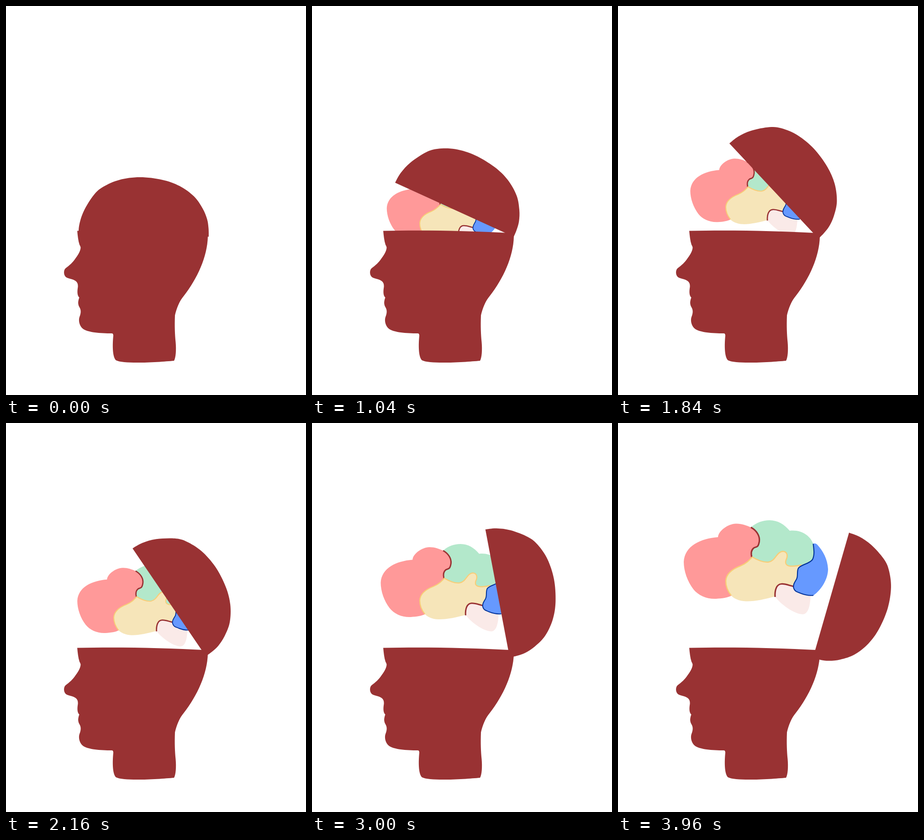
Animation, 657 px wide and 852 px high, one loop 4000 ms. Source, as an HTML page with a canvas:

```html
<!DOCTYPE html>
<html lang="en">
<head>
<meta charset="utf-8">
<title>Opening head</title>
<style>
html, body { margin: 0; width: 657px; height: 852px; overflow: hidden; background: #fff; }
canvas { display: block; }
</style>
</head>
<body>
<canvas id="stage" width="657" height="852"></canvas>
<script>
const ctx = document.getElementById('stage').getContext('2d');

const LOOP = 4000, HOLD = 200, STEP = 40, LAST = 95;
const SKIN = '#993233';
const PIVOT = { x: 428.8, y: 501.2 };
const TURN = 1.117 * Math.PI / 180;

const head = new Path2D(`M156 492.5 C240 490.5 340 492 441.5 497.5 L442 505
  C441 549 419 597 389 635.5 C380 646 373.500 662 370 677.5 C369 703 370 720 371.5 736
  C373 753 372 770 368 777 C335 780 258 785 241 776 C234 770 232.5 748 235 722
  Q235 718 232.5 717 C205 717 180 715 168.500 707 C160 700 158.500 688 161 681
  C165 671 164 665 161 660 C157 653 157.500 647 160.500 638.500
  C155.500 634 156 624 157.500 615 C158 607 155 602 146 599 C137 596 132 596 129 591
  C126 586 126.500 577 131 574 C139 568 146 562 152 553 C158 545 163 537 163.500 529
  Q163 526 161 523 C158 514 157 503 156 492.5 Z`);

// Smooth curve through the dome, then the straight cut edge.
const dome = [[157, 501], [159.2, 476.7], [169.3, 446.7], [190.7, 412.5], [211.4, 394.5],
  [246.5, 379.4], [291.7, 373.6], [340.5, 379.2], [378.7, 392.8], [410.3, 415.6],
  [429, 441.8], [438.8, 465], [442, 485], [442.5, 504]];

function smooth(points) {
  const path = new Path2D();
  path.moveTo(...points[0]);
  for (let i = 0; i < points.length - 1; i++) {
    const b = points[i], c = points[i + 1];
    const a = points[i - 1] || b, d = points[i + 2] || c;
    path.bezierCurveTo(b[0] + (c[0] - a[0]) / 6, b[1] + (c[1] - a[1]) / 6,
      c[0] - (d[0] - b[0]) / 6, c[1] - (d[1] - b[1]) / 6, c[0], c[1]);
  }
  return path;
}
const cap = smooth(dome);
cap.lineTo(PIVOT.x, PIVOT.y - 0.4);
cap.closePath();

const redSeam = 'M291 228.5 C303 235 311 247 309.5 259 C307 275 302 270 297 274 C291 279 291 286 293 294';
const goldSeam = `M248 378 C240 368 236 356 236 346 C237 327 255 318 268 313
  C282 307 288 300 294 293.500 C305 300 318 306 330 304.500 C346 301 346 284 360 281
  C372 281 372 292 368 300 C364 312 374 314 383 313.500 Q394 313 402 310.500`;
const navySeam = `M427.500 264.500 C429 277 431 289 426 299 C419 309 402 309 395 318
  C391 326 395 334 391 342 C387 349 383 354 384.500 361 C387 370 394 370 400 373
  C410 377 418 378.500 428 377.500`;
const stemSeam = 'M344 381 C343 366 347 353 358 352.500 C368 352 375 356 385 358';

// Each lobe: fill colour, shape, then optional seam path, colour and width.
const lobes = [
  ['#ff9999', `M219 250 C220 236 241 221 258 220.500 C270 220 281 224 291 228.500
    L301 230 L312 245 L312 264 L303 276 L296 300 L250 377.500 C240 383 228 384 215 385
    C195 386 176 378 165 364 C152 347 144 324 144 304 C146 269 181 253 219 250 Z`],
  ['#b3e8cb', `M291 228.500 C303 218 317 213 332 213 C350 213 364 222 376 236
    C401 233 422 247 428 266 L429 290 L424 304 L400 315 L367 325 L300 310 L293 294
    C291 286 291 279 297 274 C302 270 307 275 309.500 259 C311 247 303 235 291 228.500 Z`,
    redSeam, SKIN, 3.2],
  ['#f6e5b9', goldSeam + ' L396 322 L394 345 L386 361 L344 380 C321 386 300 391 280 390.500 C265 390 253 384 248 378 Z',
    goldSeam, '#f8cd77', 2.5],
  ['#faeae8', stemSeam + ' L422 376 C421 400 417 419 404 419 C385 418 355 396 344 380 Z',
    stemSeam, SKIN, 3.2],
  ['#6699ff', navySeam + ' C445 366 460 342 460 320 C459 298 449 280 436 266 Q432 262.500 427.500 264.500 Z',
    navySeam, '#003399', 2.2]
].map(([fill, shape, seam, color, width]) =>
  ({ fill, shape: new Path2D(shape), seam: seam && new Path2D(seam), color, width }));

function drawBrain(k) {
  const left = LAST - k, scale = 1 - 0.00294 * left;
  ctx.save();
  ctx.translate(236, 390 + 1.65 * left);
  ctx.scale(scale, scale);
  ctx.translate(-236, -390);
  for (const lobe of lobes) {
    ctx.fillStyle = lobe.fill;
    ctx.fill(lobe.shape);
    if (!lobe.seam) continue;
    ctx.strokeStyle = lobe.color;
    ctx.lineWidth = lobe.width;
    ctx.stroke(lobe.seam);
  }
  ctx.restore();
}

// The hinge drifts slightly while the cap swings open.
function drawCap(k) {
  const p = k / LAST, settle = Math.max(0, 1 - k / 12);
  ctx.save();
  ctx.translate(PIVOT.x + 1.5 * p, PIVOT.y - 1.5 * Math.sin(Math.PI * p));
  ctx.rotate(TURN * k);
  ctx.translate(1.5 * settle - PIVOT.x, 1.5 * settle - PIVOT.y);
  ctx.fill(cap);
  ctx.restore();
}

function draw(now) {
  const t = now % LOOP;
  const k = t < HOLD ? 0 : Math.min(LAST, Math.floor((t - HOLD) / STEP) + 1);
  ctx.fillStyle = '#fff';
  ctx.fillRect(0, 0, 657, 852);
  drawBrain(k);
  ctx.fillStyle = SKIN;
  ctx.fill(head);
  drawCap(k);
  requestAnimationFrame(draw);
}
draw(0);
</script>
</body>
</html>
```
